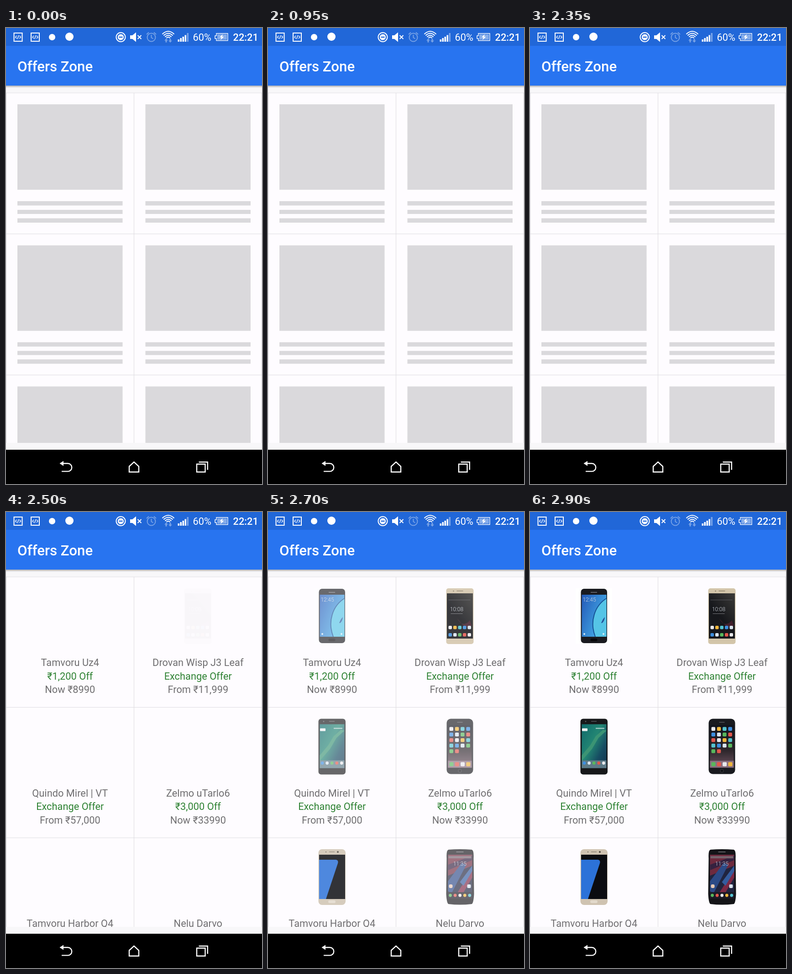
Animation, 561 px wide and 998 px high, one loop 2950 ms. Source, as an HTML page:

```html
<!DOCTYPE html>
<html lang="en">
<head>
<meta charset="utf-8">
<title>Offers Zone</title>
<style>
  html, body { margin: 0; width: 100%; height: 100%; overflow: hidden; background: #f8f7f9; }
  svg { display: block; width: 100%; height: 100%; font-family: Roboto, sans-serif; }
  .line { fill: none; stroke: #dddce0; }
  .offer { font-size: 21.8px; fill: #6f6e70; text-anchor: middle; }
  .deal { fill: #2e8233; }
  .tiny { font-size: 12px; font-weight: 300; fill: #d5dbe2; text-anchor: middle; }
  .icon { fill: none; stroke: #fff; stroke-width: 2; }
  .thin { stroke-width: 1.4; }
  .nav { stroke-width: 2.4; }
</style>
</head>
<body>
<svg viewBox="0 0 561 998">
  <defs>
    <linearGradient id="shimmer" gradientUnits="userSpaceOnUse" x1="-42" x2="42" y1="0" y2="0">
      <stop offset="0" stop-color="#dad9dc"/>
      <stop offset=".5" stop-color="#cbcacd"/>
      <stop offset="1" stop-color="#dad9dc"/>
    </linearGradient>
    <linearGradient id="shadow" x2="0" y2="1">
      <stop offset="0" stop-opacity=".3"/>
      <stop offset="1" stop-opacity="0"/>
    </linearGradient>
    <linearGradient id="lagoon" x2=".8" y2=".5">
      <stop offset="0" stop-color="#2459b8"/>
      <stop offset="1" stop-color="#3f9fe0"/>
    </linearGradient>
    <linearGradient id="graphite" x1="1" x2=".3" y2="1">
      <stop offset="0" stop-color="#3c3b39"/>
      <stop offset=".6" stop-color="#17181c"/>
    </linearGradient>
    <linearGradient id="coast" x2="1" y2=".9">
      <stop offset="0" stop-color="#106a6c"/>
      <stop offset=".45" stop-color="#238673"/>
      <stop offset=".75" stop-color="#164c62"/>
      <stop offset="1" stop-color="#123650"/>
    </linearGradient>
    <linearGradient id="dusk" x2="0" y2="1">
      <stop offset="0" stop-color="#10131c"/>
      <stop offset=".6" stop-color="#2e272c"/>
      <stop offset="1" stop-color="#6d5160"/>
    </linearGradient>
    <clipPath id="list"><rect y="141" width="561" height="767"/></clipPath>
  </defs>

  <g clip-path="url(#list)">
    <rect y="141" width="561" height="767" fill="#fefcff"/>
    <g id="loading"></g>
    <g id="offers"></g>
  </g>

  <rect y="126" width="561" height="5" fill="url(#shadow)"/>
  <rect width="561" height="126" fill="#2874f0"/>
  <rect width="561" height="39" fill="#2167d8"/>
  <text x="25" y="95" font-size="31.2" font-weight="500" fill="#fff">Offers Zone</text>

  <g id="status" fill="#fff">
    <g id="code">
      <path class="icon" d="M17.5 11h18v18h-18z"/>
      <path class="icon thin" d="M23.5 17l-3 3 3 3M29.5 17l3 3-3 3M27.8 16l-2.6 8"/>
    </g>
    <use href="#code" x="37.5"/>
    <circle cx="101" cy="20" r="7"/>
    <circle cx="139" cy="19" r="9"/>
    <circle class="icon" cx="251.5" cy="20" r="10"/>
    <circle cx="251.5" cy="20" r="6.6"/>
    <path stroke="#2167d8" stroke-width="2.4" d="M247.5 20h8"/>
    <path d="M272 16h5l8-6.5v21l-8-6.5h-5z"/>
    <path class="icon" d="M288.5 16l8 8M296.5 16l-8 8"/>
    <g class="icon" opacity=".38">
      <circle cx="318.5" cy="20.5" r="9"/>
      <path d="M318.5 15v6l4 2.5M308 14l5-4.5M329 14l-5-4.5"/>
    </g>
    <path class="icon" d="M342.5 13.500q13-12.500 26 0M345.500 16.500q10-9.500 20 0M348.500 19.500q7-7 14 0M351.500 22q4-4 8 0"/>
    <path opacity=".4" d="M351 23l4 4.5h-2.5v4h-3v-4H347zM360 32l-4-4.5h2.5v-4h3v4h2.5z"/>
    <path d="M376.5 25h3.5v5h-3.5zM381.5 22h3.5v8h-3.5zM386.5 19h3.5v11h-3.5zM391.5 15.5h3.5v14.5h-3.5z"/>
    <path opacity=".4" d="M396.5 11h3.5v19h-3.5z"/>
    <text x="409.5" y="28" font-size="21.8">60%</text>
    <path class="icon thin" d="M461 12h25v15.5h-25v-4.5h-3v-6h3z"/>
    <path opacity=".45" d="M463 14h21v11.5h-21z"/>
    <path d="M475 13.5l-7 7h4l-2 6 7.5-7.5h-4z"/>
    <text x="497.5" y="28" font-size="21.8" font-weight="500">22:21</text>
  </g>

  <rect y="923" width="561" height="75"/>
  <g class="icon nav">
    <path d="M122 953h13.5a8.7 8.7 0 0 1 0 17.4H122"/>
    <path fill="#fff" stroke="none" d="M117.5 953l8.5-5.5v11z"/>
    <path d="M270 959.5l10.5-9.7 10.5 9.7v12.3h-21z"/>
    <path d="M418 954.5h18.5v17.3H418zM422.5 950h19.3v17"/>
  </g>
</svg>

<script>
const LOOP = 2950, REVEAL = 2500, STEP = 50, SWEEP = 1300;
const HOLDS = [[250, 600], [1600, 1900]];
const COLUMNS = [0, 280.5], TOP = 142;
const byId = id => document.getElementById(id);
const range = n => [...Array(n).keys()];

const rect = (x, y, w, h, fill, r = 0) =>
  `<rect x="${x}" y="${y}" width="${w}" height="${h}" rx="${r}" fill="${fill}"/>`;
const dot = (x, y, r, fill) => `<circle cx="${x}" cy="${y}" r="${r}" fill="${fill}"/>`;
const shape = (d, fill) => `<path d="${d}" fill="${fill}"/>`;
const text = (x, y, cls, content) => `<text x="${x}" y="${y}" class="${cls}">${content}</text>`;

const gridLines = rowHeight => `<path class="line" d="M.5 ${TOP}V908M280.5 ${TOP}V908M560.5 ${TOP}V908` +
  range(3).map(row => `M0 ${TOP + row * rowHeight}H561`).join('') + '"/>';

const cells = (rowHeight, draw) => gridLines(rowHeight) + range(6).map(i =>
  `<g transform="translate(${COLUMNS[i % 2]} ${TOP + (i >> 1) * rowHeight})">${draw(i)}</g>`).join('');

const PALETTE = ['#e9e9ec', '#58b85c', '#3d8fe0', '#f0b73c', '#e2574c', '#d9e4ee', '#55c3d0'];
const appColor = i => PALETTE[i % PALETTE.length];
const iconRow = (x, y, count, gap, size, shift = 0) => range(count).map(i =>
  rect(x + i * gap, y, size, size, appColor(i * 3 + shift), 2)).join('');
const dotRow = (y, shift) => range(5).map(i => dot(9 + i * 10.6, y, 3.4, appColor(i * 3 + shift))).join('');

// Phones are drawn in a 60 x 122 box.
const phones = [
  rect(-10, 0, 80, 121, '#fff') +
  rect(1.5, 1, 57.5, 119, '#1a1b20', 7) + rect(3.5, 14, 54, 92, 'url(#lagoon)') +
  shape('M33 106C20 72 32 38 57.500 22V106z', '#55c4e6') +
  '<path d="M33 106C20 72 32 38 57.500 22" fill="none" stroke="#164f94" stroke-width="2"/>' +
  shape('M46 76q4-10 8-13-1 9-6 13z', '#24509a') +
  text(20, 29, 'tiny', '12:45') + dot(9, 100, 2, '#d8eef8') + dot(51, 100, 2, '#d8eef8') +
  rect(23, 8, 14, 1.5, '#77777c') + rect(22.5, 110, 15, 6, '#08080a', 3),

  rect(0, 0, 60, 122, '#d3c5aa', 5) + rect(1.5, 11, 57, 99, 'url(#graphite)') +
  shape('M24 66q12 22 28 4l4 12-14 4z', '#43202d') +
  rect(5, 25, 48, .7, '#6b6b72') + text(23, 50, 'tiny', '10:08') + rect(10, 55, 26, 1, '#77777c') +
  iconRow(5, 82, 5, 10.5, 7.5) + iconRow(5, 98, 5, 10.5, 7.5, 2) +
  rect(23, 5, 14, 1.5, '#8d8068') + dot(16, 6, 1.3, '#8d8068'),

  rect(0.5, 0, 59.5, 122, '#17181a', 6) + rect(3.5, 12, 54, 96, 'url(#coast)') +
  shape('M57.500 26L40 42 26 66 3.500 92V80L22 58 34 38 50 24z', '#3b9474') +
  rect(3.5, 91, 54, 17, '#5d7a87') + dotRow(97, 2) +
  rect(4, 21, 12, 6, '#f1f4f4', 1) + rect(34, 20, 19, 2, '#b7d4d2') +
  rect(24, 5, 12, 1.5, '#55575b') + dot(12, 6, 1.4, '#55575b'),

  rect(1, 0, 58, 121, '#191a1f', 9) + rect(4, 14, 52, 93, 'url(#dusk)') +
  range(5).map(row => iconRow(7, 18 + row * 12.2, row < 4 ? 4 : 2, 12.3, 8.5, row * 2)).join('') +
  rect(4, 92, 52, 15, '#8a7080') + iconRow(7, 95, 4, 12.3, 9, 1) +
  rect(24, 7, 12, 1.5, '#55565c') + dot(30, 114, 4, '#3d3e44') + dot(30, 114, 3, '#121317'),

  rect(0.5, 0, 59.5, 122, '#cfc3b1', 8) + rect(2, 12, 57, 97, '#0b0c10') +
  shape('M2 23H39q6 1 4 8L17 109H2z', '#2c72d8') +
  rect(24, 5, 12, 1.5, '#8f8473') + dot(43, 6, 2, '#4e473e') + dot(17, 6, 1, '#4e473e') +
  rect(22, 112, 16, 6, '#e2d9cb', 3),

  shape('M5 1Q30-1 56 1Q61 2 60 20L61 98Q60 118 56 120Q30 123 5 120Q1 118 0 98L1 20Q0 2 5 1z', '#141418') +
  rect(4, 12, 53, 96, '#20243f') +
  shape('M4 12H57V36L4 58z', '#6e2a3e') + shape('M4 34L57 14V24L4 46z', '#352240') +
  shape('M4 70L34 30 44 34 12 96 4 92z', '#2c4a86') + shape('M24 96L57 44V62L36 98z', '#7c2844') +
  shape('M30 72L57 36V48L38 80z', '#345c9e') + rect(4, 94, 53, 14, '#1c1a26') +
  rect(5, 15, 50, 5, '#75626c') + text(30, 36, 'tiny', '11:35') +
  rect(6, 77, 8, 8, '#e8c9b4', 3) + rect(46, 77, 8, 8, '#d7e2ee', 2) +
  dotRow(101, 1) + rect(22, 5, 16, 2, '#5b5b60')
];

const offers = [
  { name: 'Tamvoru Uz4', deal: '₹1,200 Off', price: 'Now ₹8990' },
  { name: 'Drovan Wisp J3 Leaf', deal: 'Exchange Offer', price: 'From ₹11,999', start: 2495, fade: 240 },
  { name: 'Quindo Mirel | VT', deal: 'Exchange Offer', price: 'From ₹57,000' },
  { name: 'Zelmo uTarlo6', deal: '₹3,000 Off', price: 'Now ₹33990' },
  { name: 'Tamvoru Harbor Q4', deal: '', price: '', start: 2500, fade: 240 },
  { name: 'Nelu Darvo', deal: '', price: '' }
];

byId('loading').innerHTML = cells(308.7, () =>
  shape('M25 25h230.5v187H25zM25 237h230.5v9.5H25zM25 256h230.5v9H25zM25 274.5h230.5v9.5H25z', 'url(#shimmer)'));

byId('offers').innerHTML = cells(285.5, i => {
  const { name, deal, price } = offers[i];
  return `<g class="phone" transform="translate(110 25)">${phones[i]}</g>` +
    text(140.3, 195, 'offer', name) +
    text(140.3, 224.7, 'offer deal', deal) +
    text(140.3, 254.4, 'offer', price);
});

const phoneNodes = document.querySelectorAll('.phone');

function render(time) {
  let t = Math.floor(time / STEP) * STEP;
  for (const [from, to] of HOLDS) if (t >= from && t < to) t = from;

  const revealed = t >= REVEAL;
  byId('loading').style.display = revealed ? 'none' : '';
  byId('offers').style.display = revealed ? '' : 'none';

  const bandX = 82 + 0.82 * (t % SWEEP - 300);
  byId('shimmer').setAttribute('gradientTransform', `translate(${bandX} 25) skewX(-15.6)`);

  offers.forEach(({ start = 2505, fade = 300 }, i) => {
    phoneNodes[i].setAttribute('opacity', Math.max(0, Math.min(1, (t - start) / fade)));
  });
}

let began;
function tick(now) {
  began ??= now;
  render((now - began) % LOOP);
  requestAnimationFrame(tick);
}
render(0);
requestAnimationFrame(tick);
</script>
</body>
</html>
```
